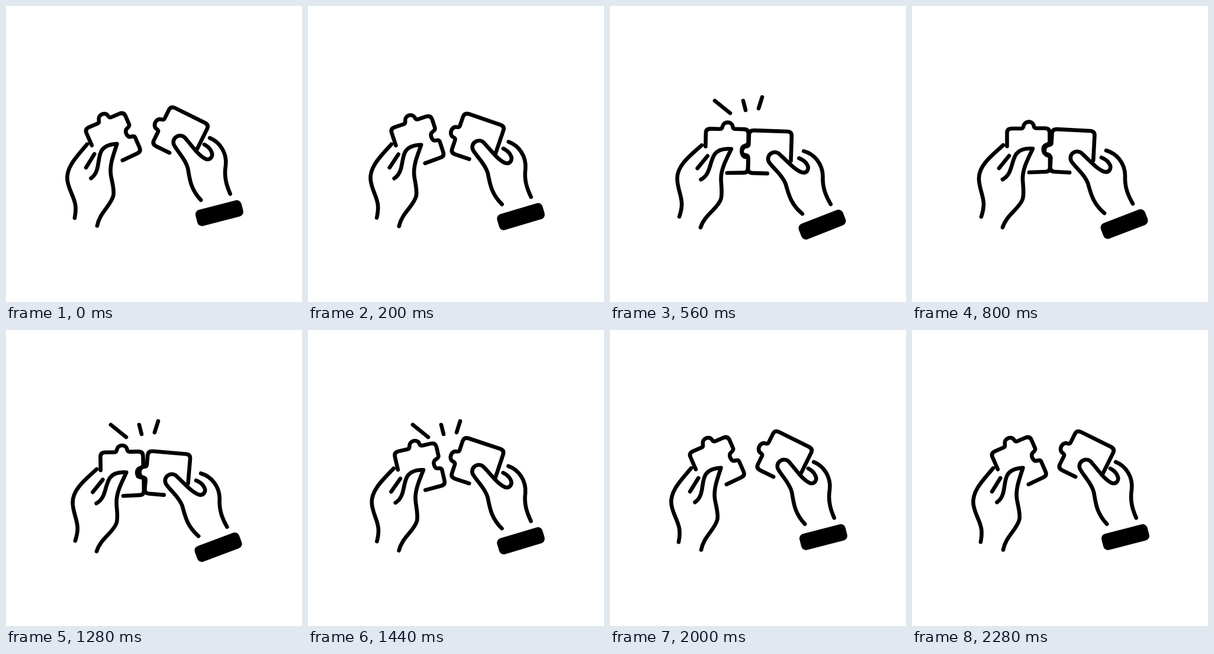
Recreate the animation shown at these times as an HTML page. Size 500 by 500 pixels, loop 2.32 s.

```html
<!DOCTYPE html>
<html lang="en">
<head>
<meta charset="utf-8">
<title>Hands joining two puzzle pieces</title>
<style>
  html, body { margin: 0; width: 100%; height: 100%; overflow: hidden; background: #fff; }
  svg { display: block; width: 100%; height: 100%; --left: 1; --right: 1; }
  path { fill: none; stroke: #000; stroke-width: 6.6; stroke-linecap: round; stroke-linejoin: round; }
  /* Each arm turns on its elbow or wrist, each piece turns further in the grip */
  #leftArm { transform-origin: 133px 365px; transform: rotate(calc(var(--left) * -7.4deg)); }
  #leftGrip { transform-origin: 164.7px 233.9px; transform: rotate(calc(var(--left) * -16.1deg)); }
  #rightArm { transform-origin: 522px 376px; transform: rotate(calc(var(--right) * 6.5deg)); }
  #rightGrip { transform-origin: 280.4px 269.2px; transform: rotate(calc(var(--right) * 16.8deg)); }
</style>
</head>
<body>
<svg viewBox="0 0 500 500">
  <g id="leftArm">
    <path d="M154 235C138 250 113 268 113 291C113 308 121 320 121 335C121 343 119 350 117 356"/>
    <path d="M153 293C170 284 167 263 176 250C182 242 193 240 204 241C196 258 187 274 187 291C187 302 190 315 187 326C181 343 160 352 153 374"/>
    <path d="M164 253L147 274"/>
    <g id="leftGrip">
      <path transform="translate(196.5 243.5)" d="M-36-6.5V-29Q-36-36.5-28-36.5H-13C-8-36.5-9-39-8-41C-6-50 7-50 9-42C9.5-39 9-37 14-37H28Q36-37 36-29V-14C36-10 31-10 28-8C24.500-5 24.500 1 27 5C30 8 36.500 5 36.500 11V29Q36.500 36.500 29 36.500L1.500 37.500"/>
    </g>
  </g>
  <g id="rightArm">
    <path d="M325 350C305 333 302 316 297 299C291 283 276 273 269 262C263 250 279 239 289 251C301 262 313 276 325 280C334 282 338 273 333 266C330 261 325 258 320 256"/>
    <path d="M328 244C346 249 360 266 360 287C359 306 365 320 373 334"/>
    <rect transform="translate(358.5 368.3) rotate(-21)" x="-40" y="-14" width="80" height="28" rx="8"/>
    <g id="rightGrip">
      <path transform="translate(271 246) rotate(3)" d="M-3 35.500H-28Q-36 35.500-36 28V13C-36 8-40 10-43.500 8C-48.500 4-48.500-4-43.500-8C-40-10-36-8-36-13V-29Q-36-36.500-28-36.500H28Q36-36.500 36-29V13"/>
    </g>
  </g>
  <path id="sparks" d="M177 160L203 181M225 160L229 176M257 154L251 173"/>
</svg>
<script>
const LOOP = 2320, HALF = LOOP / 2, STEP = 40, LEFT_LAG = 26;
const stage = document.querySelector("svg");
const sparks = document.getElementById("sparks");

// Slow start, quick swing, then a soft overshoot that settles
const ease = t => 1 - Math.exp(-((t / 275) ** 3))
  + .065 * Math.exp(-(((t - 480) / 150) ** 2));

// 0 = pieces joined, 1 = apart
function openness(t) {
  t = (t + LOOP) % LOOP;
  return t < HALF ? 1 - ease(t) : ease(t - HALF);
}

function draw(t) {
  stage.style.setProperty("--left", openness(t - LEFT_LAG));
  stage.style.setProperty("--right", openness(t));
  const lit = (t >= 280 && t < 640) || (t >= 1120 && t < 1520);
  sparks.style.visibility = lit ? "visible" : "hidden";
}

const start = performance.now();
function tick() {
  const t = performance.now() - start + 4;
  draw(Math.floor(t / STEP) * STEP % LOOP);
  requestAnimationFrame(tick);
}
tick();
</script>
</body>
</html>
```
